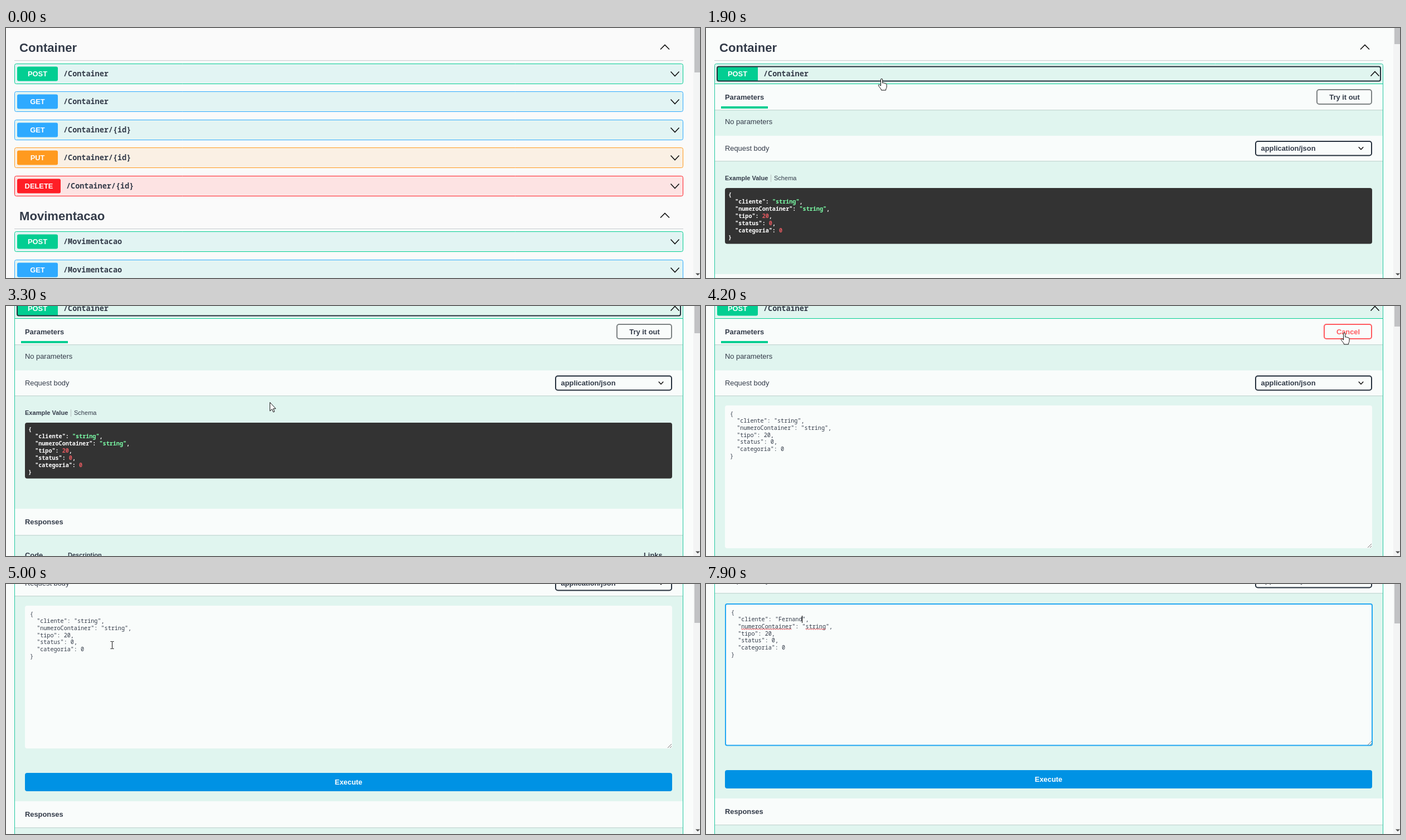
An HTML page with a canvas that plays this animation: 1245 px wide and 450 px high, repeating every 8 s.

```html
<!DOCTYPE html>
<html lang="en">
<head>
<meta charset="utf-8">
<title>API explorer</title>
<style>
  html, body { margin: 0; width: 100%; height: 100%; overflow: hidden; background: #fafafa; }
  canvas { display: block; }
</style>
</head>
<body>
<canvas id="stage" width="1245" height="450"></canvas>
<script>
const ctx = document.getElementById('stage').getContext('2d');
const W = 1245, H = 450, LOOP = 8000;
const SANS = '"Liberation Sans", Arial, sans-serif';
const MONO = '"Noto Sans Mono", "DejaVu Sans Mono", monospace';
const BODY = 12.88, SMALL = 11.04, PATH = 13.47, CODE = 10.12;
const CHAR = CODE * 0.6;
const INK = '#333b49', DARK = '#26313d', MINT = '#e0f5ef', PALE = '#f9fcfb';
const METHODS = {
  POST: { color: '#02ce92', bg: '#e2f4f3' },
  GET: { color: '#2eaaff', bg: '#e2f4f3' },
  PUT: { color: '#ff9a1f', bg: '#faf0e4' },
  DELETE: { color: '#ff1e26', bg: '#fde3e3' }
};
const GREEN = METHODS.POST.color;
const NAME = 'Fernand';
const LOADER = 145;

// Spans of time in which the picture moves in 100 ms steps.
const ACTIVE = [[0, 0], [300, 1100], [1300, 1300], [1500, 1500], [1900, 2100], [2500, 2500],
  [2700, 3000], [3300, 4300], [4700, 5100], [5300, 5700], [5900, 6100]];
const SCROLL = [[2100, 0], [2500, 35], [2700, 61], [2800, 70], [2900, 76], [3000, 78],
  [4300, 78], [4700, 130], [4800, 174], [4900, 204], [5000, 218], [5100, 223]];
const POINTER = [[300, 62, 418], [600, 190, 170], [800, 300, 22], [1000, 324, 88], [1100, 318, 108],
  [1300, 315, 91], [1900, 315, 91], [2100, 360, 135], [2500, 415, 172], [2700, 441, 182],
  [3000, 465, 177], [3300, 473, 173], [3600, 640, 264], [3800, 880, 215], [4000, 1110, 80],
  [4100, 1145, 48], [4300, 1145, 48], [4700, 920, 110], [4800, 647, 167], [4900, 380, 150],
  [5000, 190, 110], [5100, 101, 83], [5300, 104, 82], [5700, 127, 66], [5900, 136, 64]];
const KEYSTROKES = [[6700, 1], [7000, 3], [7200, 4], [7500, 5], [7700, 6], [7900, 7]];

function snap(t) {
  let last = 0;
  for (const [from, to] of ACTIVE) {
    if (t >= from) last = Math.min(to, Math.floor(t / 100) * 100);
  }
  return last;
}

function track(keys, t, i = 1) {
  if (t <= keys[0][0]) return keys[0][i];
  for (let k = 1; k < keys.length; k++) {
    const a = keys[k - 1], b = keys[k];
    if (t <= b[0]) return a[i] + (b[i] - a[i]) * (t - a[0]) / (b[0] - a[0]);
  }
  return keys[keys.length - 1][i];
}

function rect(x, y, w, h, color) {
  ctx.fillStyle = color;
  ctx.fillRect(x, y, w, h);
}

function box(x, y, w, h, r, fill, stroke, lw = 1) {
  ctx.beginPath();
  ctx.roundRect(x, y, w, h, r);
  if (fill) { ctx.fillStyle = fill; ctx.fill(); }
  if (stroke) { ctx.strokeStyle = stroke; ctx.lineWidth = lw; ctx.stroke(); }
}

// cy is the vertical middle of the capitals
function text(str, x, cy, size, color = INK, { weight = 'bold', family = SANS, align = 'left' } = {}) {
  ctx.font = `${weight} ${size}px ${family}`;
  ctx.textAlign = align;
  ctx.fillStyle = color;
  ctx.fillText(str, x, Math.round(cy + size * 0.36));
}

function chevron(cx, cy, w, h, up, lw = 1.6) {
  const d = up ? -h : h;
  ctx.beginPath();
  ctx.moveTo(cx - w, cy - d);
  ctx.lineTo(cx, cy + d);
  ctx.lineTo(cx + w, cy - d);
  ctx.strokeStyle = '#111';
  ctx.lineWidth = lw;
  ctx.stroke();
}

function heading(name, cy) {
  text(name, 24, cy, 22.08);
  chevron(1182, cy - 0.5, 8, 4, true);
  rect(15, Math.round(cy + 23), 1200, 1, '#c8cbcf');
}

function summary(method, path, y, open, ring) {
  const { color } = METHODS[method];
  const w = method === 'DELETE' ? 78 : 73;
  const cy = y + 18;
  box(20, y + 5, w, 26, ring ? 1 : 3, color);
  text(method, 20 + w / 2, cy, BODY, '#fff', { align: 'center' });
  text(path, 30 + w, cy, PATH, INK, { family: MONO });
  chevron(1200, cy, 7.5, 4, open);
  if (ring) box(20, y + 5, 1190, 26, 3, null, DARK, 2);
}

function row(method, path, y, { open = false, ring = false, extra = 0 } = {}) {
  const { color, bg } = METHODS[method];
  y = Math.round(y);
  box(15.5, y - 0.5, 1199, 36 + extra, 3, bg, color);
  if (extra) rect(16, y + 35, 1198, 1, color);
  summary(method, path, y - 0.5, open, ring);
}

function listPage(ring, loading) {
  const extra = loading ? LOADER : 0;
  const rows = [['GET', '/Container'], ['GET', '/Container/{id}'], ['PUT', '/Container/{id}'], ['DELETE', '/Container/{id}']];
  heading('Container', 35);
  row('POST', '/Container', 65, { open: loading, ring, extra });
  rows.forEach(([m, p], i) => row(m, p, 65 + 50.4 * (i + 1) + extra));
  heading('Movimentacao', 338 + extra);
  row('POST', '/Movimentacao', 367 + extra);
  row('GET', '/Movimentacao', 417.6 + extra);
  if (loading) {
    ctx.beginPath();
    ctx.arc(615, 173, 10.5, 0, Math.PI * 1.5);
    ctx.strokeStyle = '#555';
    ctx.lineWidth = 3;
    ctx.stroke();
  }
}

function band(y, h) {
  rect(16, y, 1198, h, PALE);
  rect(16, y + h, 1198, 1, 'rgba(0,0,0,.11)');
  rect(16, y + h + 1, 1198, 1, 'rgba(0,0,0,.04)');
}

function button(label, w, color, border) {
  box(1195 - w, 111, w - 1, 26, 4, PALE, border, 2);
  text(label, 1195 - w / 2, 124, BODY, color, { align: 'center' });
}

function json(x, cy, pitch, weight, colors, client = 'string') {
  const put = (s, col, line, color) =>
    text(s, x + col * CHAR, cy + line * pitch, CODE, color, { weight, family: MONO });
  const fields = [['cliente', `"${client}"`], ['numeroContainer', '"string"'], ['tipo', '20'], ['status', '0'], ['categoria', '0']];
  put('{', 0, 0, colors.plain);
  fields.forEach(([key, value], i) => {
    const col = key.length + 6;
    put(`"${key}":`, 2, i + 1, colors.plain);
    put(value, col, i + 1, value[0] === '"' ? colors.string : colors.number);
    if (i < fields.length - 1) put(',', col + value.length, i + 1, colors.plain);
  });
  put('}', 0, fields.length + 1, colors.plain);
}

function squiggle(x, y, w) {
  ctx.beginPath();
  for (let i = 0; i <= w; i += 2) ctx.lineTo(x + i, y + (i % 4 ? 1 : -0.5));
  ctx.strokeStyle = '#e0303a';
  ctx.lineWidth = 1;
  ctx.stroke();
}

function example() {
  text('Example Value', 34, 270, SMALL);
  rect(116, 264, 1, 13, '#b9c2c0');
  text('Schema', 122, 270, SMALL, INK, { weight: 'normal' });
  box(34, 288, 1161, 100.5, 4, '#333');
  json(40, 300, 12.83, 'bold', { plain: '#fff', string: '#7cffa8', number: '#e65a60' });
}

function editor(t) {
  const focus = t >= 5900;
  const typed = KEYSTROKES.reduce((n, [at, count]) => t >= at ? count : n, 0);
  const x = focus ? 45 : 43, cy = focus ? 274 : 272;
  const start = x + 14 * CHAR - CHAR / 4 + 1;
  if (focus) box(35, 259, 1160, 254.5, 3, PALE, '#22a7f2', 2);
  else box(34, 257, 1161, 257, 4, PALE);
  json(x, cy, 12.65, '500', { plain: INK, string: INK, number: INK }, typed ? NAME.slice(0, typed) : 'string');
  if (t >= 6100 && !typed) {
    rect(start, 280, 6 * CHAR, 13, '#3390ff');
    text('string', x + 14 * CHAR, cy + 12.65, CODE, '#fff', { weight: '500', family: MONO });
  }
  if (typed) rect(Math.round(x + (14 + typed) * CHAR) - 1, 280, 1, 13, '#000');
  if (t >= 6400) {
    squiggle(x + 3 * CHAR, 304, 15 * CHAR);
    squiggle(x + 22 * CHAR, 304, 6 * CHAR);
  }
  ctx.beginPath();
  ctx.moveTo(1187, 513); ctx.lineTo(1194, 506);
  ctx.moveTo(1191, 513); ctx.lineTo(1194, 510);
  ctx.strokeStyle = '#777';
  ctx.lineWidth = 1;
  ctx.stroke();
  box(34, 558, 1161, 33, 4, '#0092e4');
  text('Execute', 614.5, 574.7, BODY, '#fff', { align: 'center' });
}

function openPage(t, ring, edit) {
  heading('Container', 35);
  box(15.5, 64.5, 1199, 900, 3, MINT, '#22c8a0');
  rect(16, 100, 1198, 1, GREEN);
  summary('POST', '/Container', 64.5, true, ring);

  band(101, 46);
  text('Parameters', 34, 124, BODY);
  rect(27, 141, 84, 4, GREEN);
  if (edit) button('Cancel', 86, '#ff5a5f', '#ff5a5f');
  else button('Try it out', 99, INK, '#7d8283');
  text('No parameters', 34, 168, BODY, INK, { weight: 'normal' });

  band(194, 45);
  text('Request body', 34, 216.3, BODY, INK, { weight: 'normal' });
  box(986, 204, 208, 25.5, 4, PALE, DARK, 2);
  text('application/json', 995.5, 216.3, BODY);
  chevron(1175, 216.5, 4.2, 2.2, false);

  if (edit) editor(t);
  else example();

  const top = edit ? 609 : 443;
  band(top, 47);
  text('Responses', 34, top + 23.7, BODY);
  text('Code', 34, top + 83, BODY);
  text('Description', 111, top + 83, SMALL);
  text('Links', 1144, top + 83, BODY);
}

function scrollbar(thumb) {
  rect(1233, 0, 12, H, '#f3f4f4');
  rect(1235, 0, 10, thumb, '#c1c2c4');
  ctx.beginPath();
  ctx.moveTo(1237, 441.5);
  ctx.lineTo(1245, 441.5);
  ctx.lineTo(1241, 445.5);
  ctx.fillStyle = '#505050';
  ctx.fill();
}

const ARROW = new Path2D('M.5 .5V16L4.2 12.6L6.6 18L8.8 17L6.5 11.8H11Z');
const HAND = new Path2D('M4.5 13V2a1.6 1.6 0 0 1 3.2 0V8.2c1-1 2.6-.6 2.7.5c1-.8 2.4-.4 2.5.7' +
  'c1-.6 2.2-.1 2.2 1.2V15c0 2-1.6 3-1.6 6H5.6C5.4 18 1.5 15.5 .4 12.6c-.6-1.6 1.4-2.4 2.4-1z');
const BEAM = new Path2D('M-3 -6.5H-.7L0 -6L.7 -6.5H3M0 -6V6M-3 6.5H-.7L0 6L.7 6.5H3');

function overRow(y) {
  return y > 65 && y < 450 && [65, 115, 166, 216, 266, 367, 418].some(r => y >= r && y <= r + 36);
}

function pointer(t, s) {
  if (t < 300 || t >= 6700) return;
  const x = Math.round(track(POINTER, s)), y = Math.round(track(POINTER, s, 2));
  const hand = s < 2000 ? overRow(y) : s >= 4100 && s < 4700;
  ctx.save();
  ctx.lineWidth = 1;
  ctx.strokeStyle = '#111';
  ctx.fillStyle = '#fff';
  if (s >= 5000) {
    ctx.translate(x + 0.5, y);
    ctx.stroke(BEAM);
  } else {
    const shape = hand ? HAND : ARROW;
    ctx.translate(hand ? x - 6 : x, y);
    ctx.fill(shape);
    ctx.stroke(shape);
  }
  ctx.restore();
}

function draw(t) {
  const s = snap(t);
  const ring = t >= 1300 && t < 4100;
  const open = t >= 1900, edit = t >= 4200;
  const scroll = Math.round(track(SCROLL, s));
  rect(0, 0, W, H, open ? '#fafcfb' : '#fafafa');
  ctx.save();
  ctx.translate(0, -scroll);
  if (open) openPage(t, ring, edit);
  else listPage(ring, t >= 1500);
  ctx.restore();
  let thumb = t < 1500 ? 80 : 61;
  if (open) thumb = edit ? 18.5 + 0.235 * scroll : 29 + 0.26 * scroll;
  scrollbar(Math.round(thumb));
  pointer(t, s);
}

const begin = performance.now();
function tick() {
  draw((performance.now() - begin) % LOOP);
  requestAnimationFrame(tick);
}
tick();
</script>
</body>
</html>
```
